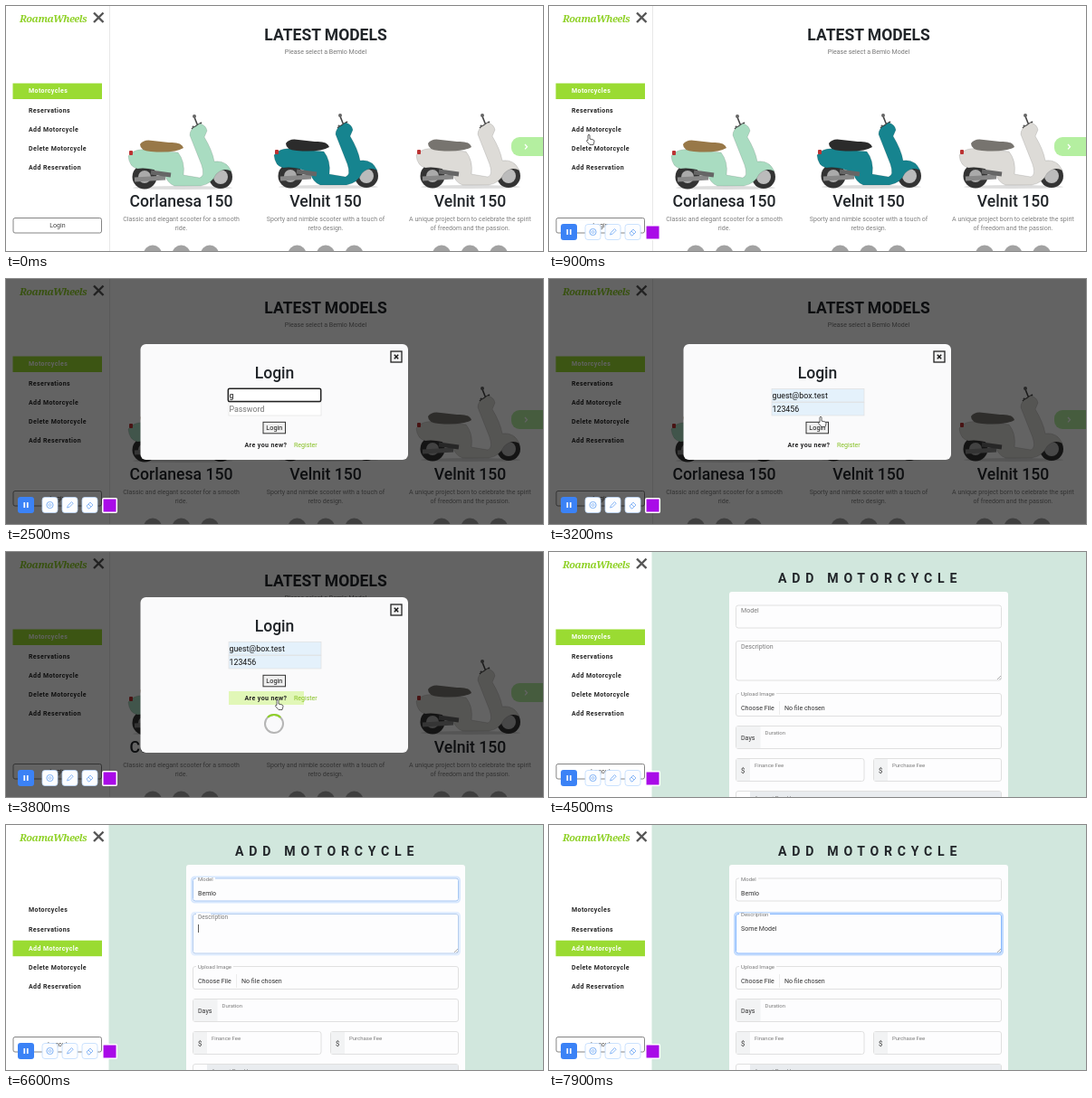
Animation of 593 by 271 pixels, one loop 8 s. Source, as an HTML page:

```html
<!DOCTYPE html>
<html lang="en">
<head>
<meta charset="utf-8">
<title>Scooter rental</title>
<style>
html, body { margin: 0; height: 100%; overflow: hidden; background: #fff }
svg { display: block; width: 100vw; height: 100vh; font-family: Roboto, sans-serif }
text { white-space: pre }
</style>
</head>
<body>
<svg id="stage" viewBox="0 0 593 271"></svg>
<script>
const LOOP = 8000;
const stage = document.getElementById('stage');

const text = (x, y, size, str, fill = '#333', extra = '') =>
  `<text x="${x}" y="${y}" font-size="${size}" fill="${fill}" ${extra}>${str}</text>`;
const mid = (x, y, size, str, fill, extra = '') =>
  text(x, y, size, str, fill, 'text-anchor="middle" ' + extra);
const rect = (x, y, w, h, fill, extra = '') =>
  `<rect x="${x}" y="${y}" width="${w}" height="${h}" fill="${fill}" ${extra}/>`;
const path = (d, stroke, width = 1, fill = 'none') =>
  `<path d="${d}" stroke="${stroke}" stroke-width="${width}" fill="${fill}"/>`;
const group = (id, body, extra = '') => `<g id="${id}" ${extra}>${body}</g>`;
const BOLD = 'font-weight="700"', MEDIUM = 'font-weight="500"';
const SPACED = BOLD + ' letter-spacing=".4"';

// Catalogue page
const scooter = (dx, dy, paint, seat) => `<g transform="translate(${dx} ${dy})">
  <ellipse cx="195" cy="201" rx="55" ry="2" fill="#ddd"/>
  <circle cx="153" cy="189" r="13.5" fill="#333"/><circle cx="153" cy="189" r="7" fill="#aaa"/>
  <circle cx="237" cy="189" r="13" fill="#333"/><circle cx="237" cy="189" r="8" fill="#bbb"/>
  ${path('M212 133L208 123M205 136L216 129', '#444', 1.6)}
  ${path('M214 140L206 133', '#555', 2)}
  <circle cx="208" cy="122" r="2" fill="#666"/>
  ${path('M135 166Q142 157 155 159L190 162Q198 172 196 187L214 190Q220 188 216 176L203 143Q203 136 210 133L214 130Q221 132 222 138L219 145Q228 160 230 172Q243 170 249 183Q240 178 232 186Q227 197 215 199L186 199Q178 196 175 186Q160 178 145 180Q136 178 135 166Z', '#0003', .6, paint)}
  ${path('M148 153Q152 147 162 149L180 151Q194 150 196 157Q186 163 160 161Q148 160 148 153Z', 'none', 0, seat)}
  ${path('M142 192L176 190', '#888', 5)}${path('M160 184L182 187', '#666', 5)}
  ${rect(136, 160, 4, 5, '#b33', 'rx="1"')}
</g>`;

const card = (cx, name, line1, line2) =>
  mid(cx, 222, 17.6, name, '#212529', MEDIUM) +
  mid(cx, 237.5, 7.05, line1, '#808080') + mid(cx, 248, 7.05, line2, '#808080') +
  [-31.5, 0, 31.5].map(d => `<circle cx="${cx + d}" cy="274.5" r="10" fill="#a2a2a2"/>`).join('');

const catalogue = rect(114, 0, 1, 271, '#e8e8e8') +
  mid(353, 38, 17.5, 'LATEST MODELS', '#212529', BOLD) +
  mid(353, 53, 7.05, 'Please select a Bemlo Model', '#777') +
  scooter(0, 0, '#a9dcc1', '#987848') +
  scooter(161, -1, '#16848f', '#2b2b2b') +
  scooter(318, -1, '#dddbd7', '#77746f') +
  card(193.5, 'Corlanesa 150', 'Classic and elegant scooter for a smooth', 'ride.') +
  card(353, 'Velnit 150', 'Sporty and nimble scooter with a touch of', 'retro design.') +
  card(512.5, 'Velnit 150', 'A unique project born to celebrate the spirit', 'of freedom and the passion.') +
  rect(558, 145, 50, 21, '#b4efa0', 'rx="9"') + path('M573 153l2.5 2.7l-2.5 2.7', '#fff', 1.3);

// Form page
const LINE = '#e0e0e0';
const box = (x, y, w, h, id = '') => rect(x, y, w, h, '#fdfdfe', `rx="2.5" stroke="${LINE}" ${id && `id="${id}"`}`);
const field = (id, y, h, label) =>
  rect(205, y - 1.5, 296, h + 3, 'none', `rx="3.5" stroke="#c2dbfe" stroke-width="2" id="${id}Ring"`) +
  box(206.5, y, 293, h, id + 'Box') +
  rect(210, y - 1, 0, 2, '#fdfdfe', `id="${id}Notch"`) +
  text(212, y + 8, 7.05, label, '#7b7b7b', `id="${id}Label"`) +
  text(212, y + 18.7, 7.05, '', '#333', `id="${id}Value"`) +
  rect(212, y + 11.5, .8, 9, '#333', `id="${id}Caret"`);
const money = (x, y, w, label) => box(x, y, w, 25) +
  rect(x + .5, y + .5, 15, 24, '#f2f3f4') + text(x + 5.5, y + 15, 7.6, '$') +
  text(x + 20.5, y + 9.6, 6, label, '#7b7b7b');

const form = rect(113, 0, 480, 271, '#d1e7dd') +
  text(253, 34.3, 14.1, 'ADD MOTORCYCLE', '#212529', BOLD + ' letter-spacing="5.75"') +
  rect(199, 44, 308, 240, '#fdfdfe', 'rx="3"') +
  field('model', 59, 25, 'Model') +
  field('desc', 98.5, 43.5, 'Description') +
  path('M495 141l4-4M497.5 141l1.5-1.5', '#777', .6) +
  box(206.5, 156.5, 293, 25) + rect(210, 155, 41, 3, '#fdfdfe') +
  text(212, 159, 6, 'Upload Image', '#7b7b7b') +
  text(212, 175, 7.05, 'Choose File') + rect(254, 165, 1, 15, '#ececec') +
  text(260, 175, 7.05, 'No file chosen') +
  box(206.5, 192.5, 293, 25) + rect(207, 193, 26.5, 24, '#f2f3f4') +
  text(212, 207.5, 7.05, 'Days') + text(238.5, 202.3, 6, 'Duration', '#7b7b7b') +
  money(206.5, 228.5, 141.5, 'Finance Fee') + money(358.5, 228.5, 141, 'Purchase Fee') +
  box(206.5, 264.5, 293, 25) + rect(222, 265, 277, 10, '#e9ecef') +
  text(227, 274, 6, 'Amount Payable', '#7b7b7b');

// Sidebar
const ITEMS = ['Motorcycles', 'Reservations', 'Add Motorcycle', 'Delete Motorcycle', 'Add Reservation'];
const sidebar = rect(0, 0, 113.5, 271, '#fff') +
  text(15, 18, 11, 'RoamaWheels', '#8fd127', 'font-style="italic" font-weight="700" style="font-family:\'Noto Serif\',serif" letter-spacing="-.5"') +
  path('M97 7.5l10.5 10.5M107.5 7.5l-10.5 10.5', '#555', 2.4) +
  rect(7.5, 85.5, 98.5, 17.5, '#9adb32', 'id="active"') +
  ITEMS.map((s, i) => text(25, 96.4 + 21.1 * i, 7, s, '#222', SPACED + ` id="item${i}"`)).join('') +
  rect(8, 234.5, 97.5, 16.5, '#fff', 'rx="2" stroke="#777" stroke-width=".9"') +
  mid(57, 245.2, 7.05, 'Login', '#444', 'id="session"');

// Login dialog
const dialog = rect(0, 0, 593, 271, '#000', 'opacity=".61"') +
  rect(148.5, 72, 295.5, 128, '#fafafb', 'rx="6" id="panel"') +
  group('content',
    rect(246, 176, 83, 15, '#e1f7b7', 'id="hover"') +
    mid(296.5, 109.5, 17.5, 'Login', '#212529', MEDIUM) +
    rect(425, 80, 12, 12, '#f0f0f0', 'stroke="#222" stroke-width="1.3"') +
    path('M428.8 83.8l4.4 4.4M433.2 83.8l-4.4 4.4', '#111', 1.4) +
    rect(246, 121.5, 102, 14.5, '#fff', 'stroke="#ddd" stroke-width=".6" id="email"') +
    rect(246, 136.5, 102, 14.5, '#fff', 'stroke="#ddd" stroke-width=".6" id="pass"') +
    rect(245.3, 121.3, 102.4, 14.3, 'none', 'rx="1.5" stroke="#222" stroke-width="1.5" id="emailFocus"') +
    text(246.5, 131.8, 8.8, '', '#757575', 'id="emailText"') +
    text(246.5, 146.8, 8.8, '', '#757575', 'id="passText"') +
    rect(284, 158.3, 24.5, 12.5, '#efefef', 'stroke="#333"') +
    mid(296.3, 167.2, 7.3, 'Login', '#111') +
    text(263.5, 186.2, 7, 'Are you new?', '#222', SPACED) +
    text(318, 186.2, 7, 'Register', '#86c022')) +
  group('spinner',
    '<circle cx="296" cy="190" r="10" fill="none" stroke="#b5b5b5" stroke-width="2"/>' +
    path('M288.9 182.9A10 10 0 0 1 303.1 182.9', '#8fd127', 2));

// Recorder toolbar
const tool = (x, icon) => rect(x, 241.5, 17, 17, '#fcfdff', 'rx="3" stroke="#bfdbfe" stroke-width=".8"') +
  `<g transform="translate(${x + 8.5} 250)">${icon}</g>`;
const toolbar = rect(13, 241, 18, 18, '#3b82f6', 'rx="3"') +
  path('M20.3 247v6M23.8 247v6', '#fff', 1.7) +
  tool(40, '<circle r="3.6" fill="none" stroke="#7fb2f5"/><circle r="1.4" fill="none" stroke="#7fb2f5" stroke-width=".8"/>') +
  tool(62, path('M-3 3l1-2.5l4-4l1.7 1.7l-4 4z', '#7fb2f5', .9)) +
  tool(84, path('M-3.5 1l4-4l3 3l-4 4h-1zM-1.5 -1l3 3', '#7fb2f5', .9)) +
  rect(106.8, 242.8, 15.5, 15.5, '#a90be8', 'rx="1" stroke="#fff" stroke-width="1.5"');

const hand = path('M0 1q1-2 2 0v4l4 1q1.2.6 1 2l-1 3.5h-4l-3.5-4q0-1.5 1.5-1z', '#222', .7, '#fff');

stage.innerHTML = group('catalogue', catalogue) + group('form', form) + sidebar +
  group('dialog', dialog) + group('toolbar', toolbar) + group('cursor', hand);

const $ = id => document.getElementById(id);
const set = (id, attrs) => { for (const k in attrs) $(id).setAttribute(k, attrs[k]); };
const show = (id, on) => set(id, { visibility: on ? 'inherit' : 'hidden' });
const clamp = v => Math.max(0, Math.min(1, v));
const between = (t, a, b) => t >= a && t < b;

const OPEN = 1100, FILL = 2900, SUBMIT = 3500, ENTER = 4400;
const MOVES = [[300, 22, 247], [900, 43, 142], [1500, 43, 142], [2050, 299, 128],
  [2950, 299, 128], [3350, 299, 163], [ENTER, 299, 163]];

function moveCursor(t) {
  const i = MOVES.findIndex((m, k) => k && t < m[0]);
  show('cursor', t >= MOVES[0][0] && i > 0 && !between(t, 2350, FILL));
  if (i < 1) return;
  const [t0, x0, y0] = MOVES[i - 1], [t1, x1, y1] = MOVES[i];
  const p = clamp((t - t0) / (t1 - t0)), e = p * p * (3 - 2 * p);
  set('cursor', { transform: `translate(${x0 + (x1 - x0) * e} ${y0 + (y1 - y0) * e})` });
}

// Floating label, focus ring, typed value and blinking caret
function drawField(t, id, y, notch, value, focus, blur, start, step) {
  const up = clamp((t - focus) / 150), glow = Math.min(up, clamp(1 - (t - blur) / 200));
  const typed = Math.max(0, Math.min(value.length, Math.floor((t - start) / step) + 1));
  const lastKey = typed ? start + (typed - 1) * step : focus;
  set(id + 'Label', { y: y + 8 - 5.2 * up, 'font-size': 7.05 - 1.05 * up });
  set(id + 'Notch', { width: notch * up });
  set(id + 'Ring', { opacity: glow });
  const mix = (a, b) => Math.round(a + (b - a) * glow);
  set(id + 'Box', { stroke: `rgb(${mix(224, 134)},${mix(224, 183)},${mix(224, 254)})` });
  $(id + 'Value').textContent = value.slice(0, typed);
  show(id + 'Caret', between(t, focus, blur) && (t - lastKey) % 1000 < 500);
  set(id + 'Caret', { x: 212 + (typed ? $(id + 'Value').getComputedTextLength() + .3 : 0) });
}

function drawDialog(t) {
  const filled = t >= FILL, busy = t >= SUBMIT, typing = t >= 2400;
  show('dialog', between(t, OPEN, ENTER));
  set('panel', { y: busy ? 50 : 72, height: busy ? 172 : 128 });
  set('content', { transform: `translate(0 ${busy ? -22 : 0})` });
  show('hover', busy);
  show('spinner', busy);
  set('spinner', { transform: `rotate(${(t - 3800) * .36} 296 190)` });
  show('emailFocus', between(t, 2150, FILL));
  for (const id of ['email', 'pass']) set(id, { fill: filled ? '#e4f1fb' : '#fff' });
  $('emailText').textContent = filled ? 'guest@box.test' : typing ? 'g' : 'Email';
  $('passText').textContent = filled ? '123456' : 'Password';
  set('emailText', { fill: typing ? '#111' : '#757575' });
  set('passText', { fill: filled ? '#111' : '#757575' });
}

function draw(t) {
  const inside = t >= ENTER, active = t >= 4600 ? 2 : 0;
  show('catalogue', !inside);
  show('form', inside);
  show('toolbar', t >= 300);
  set('active', { y: 85.5 + 21.1 * active });
  ITEMS.forEach((_, i) => set('item' + i, { fill: i === active ? '#fff' : '#222' }));
  $('session').textContent = inside ? 'Logout' : 'Login';
  drawDialog(t);
  drawField(t, 'model', 59, 21, 'Bemlo', 5300, 6530, 5600, 140);
  drawField(t, 'desc', 98.5, 34, 'Some Model', 6530, LOOP, 6720, 70);
  for (const id of ['model', 'desc']) if (!inside) show(id + 'Caret', false);
  moveCursor(t);
}

function tick(now) {
  draw(now % LOOP);
  requestAnimationFrame(tick);
}
draw(0);
requestAnimationFrame(tick);
</script>
</body>
</html>
```
